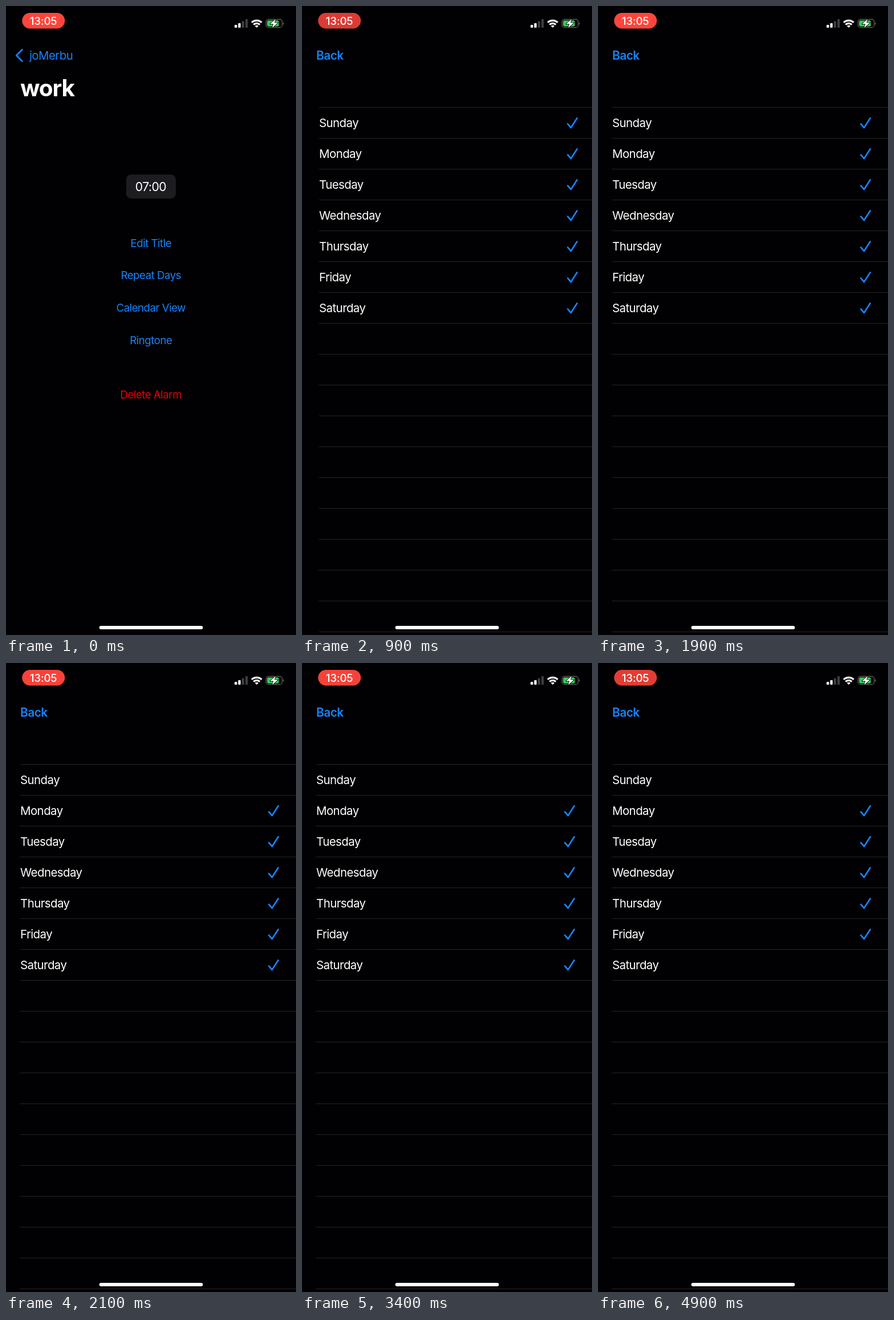
Recreate the animation shown at these times as an HTML page. Size 509 by 1101 pixels, loop 5 s.

```html
<!DOCTYPE html>
<html lang="en">
<head>
<meta charset="utf-8">
<title>Alarm repeat days</title>
<style>
  html, body { margin: 0; width: 100%; height: 100%; overflow: hidden; background: #010002; }
  svg { display: block; width: 100vw; height: 100vh; }
  text { font: 400 20.5px Inter, Roboto, sans-serif; letter-spacing: -.029em; fill: #fff; }
  .page { fill: #010002; }
  .mid { text-anchor: middle; }
  .blue { fill: #1684fc; }
  .link { font-size: 18.8px; }
  .time { font-size: 21.4px; }
  .clock { font-size: 18.8px; font-weight: 500; letter-spacing: -.01em; }
  .title { font-size: 40.6px; font-weight: 700; }
  .back { font-size: 21px; font-weight: 600; }
  .stroke { fill: none; stroke: #1684fc; stroke-width: 2.7; stroke-linecap: round; stroke-linejoin: round; }
</style>
</head>
<body>
<svg viewBox="0 0 509 1101">
  <rect class="page" width="509" height="1101"/>

  <g id="alarm">
    <g id="alarmBar">
      <path class="stroke" d="M28.5 76.3 18.3 86.5 28.5 96.7"/>
      <text class="blue" x="41" y="93.5">joMerbu</text>
      <text class="title" x="25" y="157.5">work</text>
    </g>
    <rect x="211" y="295" width="87" height="42" rx="8.5" fill="#1d1c20"/>
    <text class="mid time" x="254" y="323.7">07:00</text>
    <g id="links"></g>
    <text class="mid link" x="254.3" y="687.3" style="fill:#f00000">Delete Alarm</text>
  </g>

  <g id="list">
    <rect class="page" width="520" height="1101"/>
    <g id="rows"></g>
  </g>
  <text id="back" class="back blue" x="25" y="93.5">Back</text>

  <rect id="pill" x="28.3" y="12" width="75" height="27.5" rx="13.75"/>
  <text class="mid clock" x="65.6" y="32.7">13:05</text>

  <g id="signal"></g>
  <g fill="none" stroke="#fff" stroke-width="3.2">
    <path d="M431.2 28.9a12.6 12.6 0 0 1 17.6 0"/>
    <path d="M434.5 32.6a7.9 7.9 0 0 1 11 0"/>
    <path d="M440 38 436.9 35a4.4 4.4 0 0 1 6.2 0Z" fill="#fff" stroke="none"/>
  </g>
  <rect x="456.3" y="23.3" width="28.6" height="14.4" rx="4.5" fill="none" stroke="#69696c" stroke-width="1.2"/>
  <path d="M486.3 28.3q3 2.2 0 4.6Z" fill="#69696c"/>
  <rect x="458.2" y="25.2" width="20.6" height="10.6" rx="2.8" fill="#32d05a"/>
  <path d="M473.2 22.8 463.4 31.6H469.3L467.2 38.4 477.2 29.3H471.2Z"
        fill="#fff" stroke="#000" stroke-width="1.6" paint-order="stroke" stroke-linejoin="round"/>
  <rect x="163.7" y="1085" width="181.8" height="6" rx="3" fill="#fff"/>
</svg>

<script>
const LOOP = 5000, STEP = 100, WIDTH = 509;
const PUSH_START = 300, PUSH_RATE = 7.7;
const PULSE_PERIOD = 1870, PULSE_OFFSET = 30;
const ROW_TOP = 177, ROW_HEIGHT = 54;
const DAYS = ['Sunday', 'Monday', 'Tuesday', 'Wednesday', 'Thursday', 'Friday', 'Saturday'];
const TAPS = { Sunday: 2000, Saturday: 3500 };

const byId = id => document.getElementById(id);

function add(parent, tag, attrs, content = '') {
  const node = document.createElementNS('http://www.w3.org/2000/svg', tag);
  for (const key in attrs) node.setAttribute(key, attrs[key]);
  node.textContent = content;
  return parent.appendChild(node);
}

const links = ['Edit Title', 'Repeat Days', 'Calendar View', 'Ringtone'].map((label, i) =>
  add(byId('links'), 'text', { class: 'mid link blue', x: 254.3, y: 421.8 + i * 56.6 }, label));

[5, 8, 11.5, 15].forEach((height, i) => add(byId('signal'), 'rect', {
  x: 401.2 + i * 6.3, y: 38 - height, width: 4.3, height, rx: 1, fill: i < 2 ? '#fff' : '#3d3d40'
}));

const rows = byId('rows');
const tapped = DAYS.map((day, i) => {
  const y = ROW_TOP + i * ROW_HEIGHT;
  const shade = add(rows, 'rect', { x: 0, y, width: WIDTH, height: ROW_HEIGHT, fill: '#2c2c2e' });
  add(rows, 'text', { x: 25, y: y + 34.6 }, day);
  const check = add(rows, 'path', { class: 'stroke', d: `M461.3 ${y + 29.4} 467 ${y + 36} 477.8 ${y + 19.3}` });
  return { shade, check, time: TAPS[day] ?? Infinity };
});
for (let i = 0; i < 18; i++) {
  add(rows, 'rect', { x: 24.5, y: ROW_TOP + i * ROW_HEIGHT, width: 500, height: 1, fill: '#242426' });
}

const mix = (a, b, k) => Math.round(a + (b - a) * k);
const shift = (id, x) => byId(id).setAttribute('transform', `translate(${x.toFixed(2)})`);

function draw(t) {
  const left = t < PUSH_START ? 1 : Math.exp(-PUSH_RATE * (t - PUSH_START) / 1000);
  shift('list', WIDTH * left);
  shift('alarm', -0.3 * WIDTH * (1 - left));
  byId('alarmBar').setAttribute('opacity', left);
  byId('back').setAttribute('opacity', 1 - left);
  links[1].setAttribute('opacity', t >= 200 ? 0.3 : 1);

  for (const { shade, check, time } of tapped) {
    shade.setAttribute('opacity', t >= time && t < time + STEP ? 1 : 0);
    check.setAttribute('opacity', t < time + STEP ? 1 : 0);
  }

  const dim = (1 - Math.cos(2 * Math.PI * (t + PULSE_OFFSET) / PULSE_PERIOD)) / 2;
  byId('pill').setAttribute('fill', `rgb(${mix(255, 220, dim)},${mix(69, 59, dim)},${mix(59, 52, dim)})`);
}

const start = performance.now();
function tick() {
  const t = (performance.now() - start) % LOOP;
  draw(Math.floor(t / STEP) * STEP);
  requestAnimationFrame(tick);
}
draw(0);
requestAnimationFrame(tick);
</script>
</body>
</html>
```
